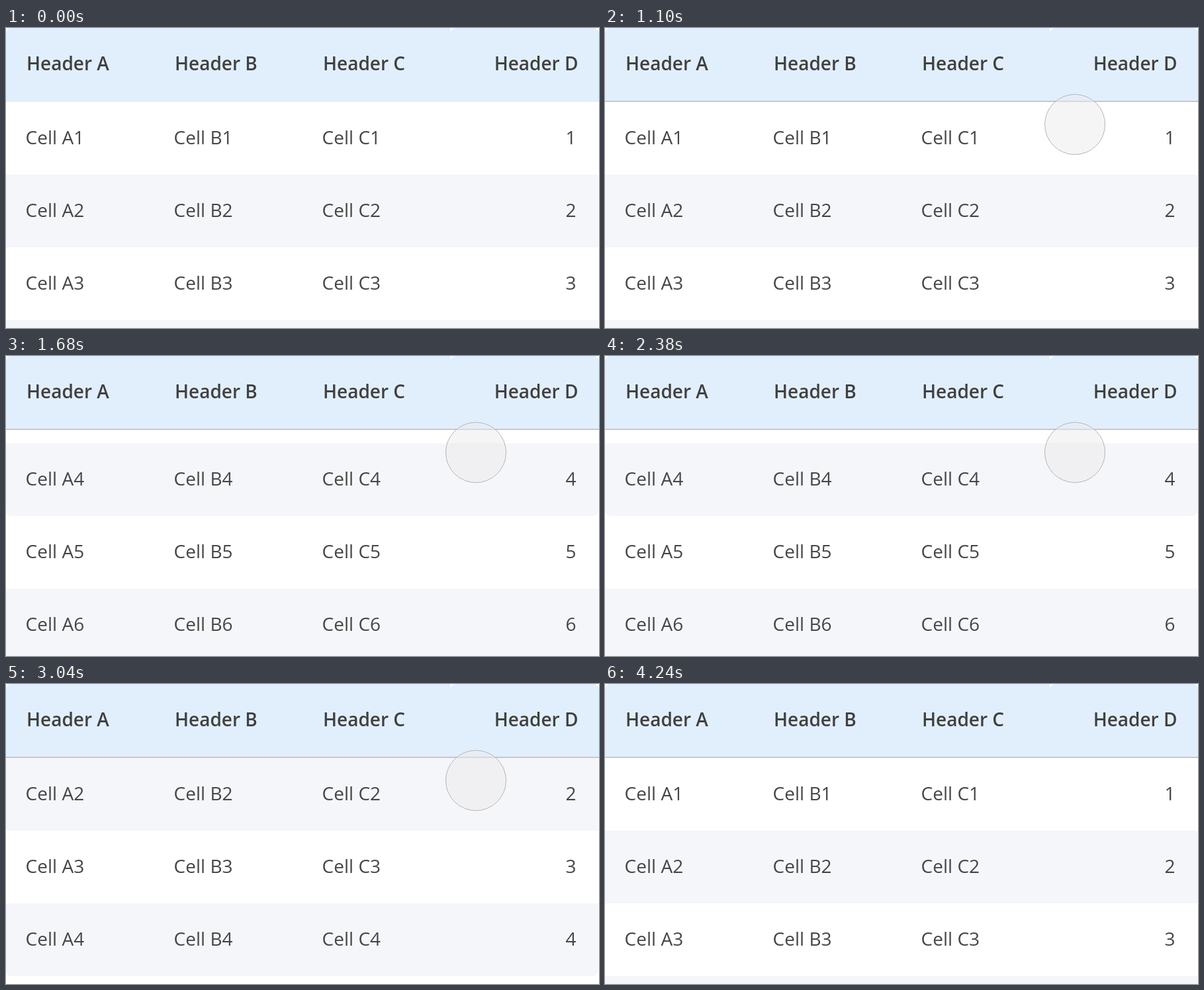
An HTML page with a canvas for the animation above (4720 ms loop, 896 by 454 pixels).

```html
<!DOCTYPE html>
<html lang="en">
<head>
<meta charset="utf-8">
<title>Table with sticky header</title>
<style>
html, body { margin: 0; width: 100%; height: 100%; overflow: hidden; background: #fff; }
canvas { display: block; }
</style>
</head>
<body>
<canvas id="stage" width="896" height="454"></canvas>
<script>
const LOOP = 4720, W = 896, H = 454, HEAD = 112, ROW = 110, COL = 224;
const CELL_FONT = '28px "Open Sans", "Noto Sans", sans-serif';
const HEAD_FONT = '600 28px "Open Sans", "Open Sans SemiBold", "Noto Sans", sans-serif';
const ctx = document.getElementById('stage').getContext('2d');

// [time, value, speed per ms]
const SCROLL = [
  [1150, 0, 0], [1460, 252, .45], [1690, 310, 0],
  [2370, 310, 0], [2760, 184, -.33], [3040, 110, -.3], [3350, 0, 0]
];
// Cursor path, both ways, between the resting place and a point above the stage
const REST = [710, 146], AWAY = [825, -48];

const progress = (t, from, to) => Math.min(1, Math.max(0, (t - from) / (to - from)));

function hermite(keys, t) {
  if (t <= keys[0][0]) return keys[0][1];
  for (let i = 1; i < keys.length; i++) {
    const [t0, a, va] = keys[i - 1], [t1, b, vb] = keys[i];
    if (t > t1) continue;
    const d = t1 - t0, u = (t - t0) / d, s = u * u * (3 - 2 * u);
    return a + (b - a) * s + d * u * (1 - u) * (va * (1 - u) - vb * u);
  }
  return keys[keys.length - 1][1];
}

function box(x, y, w, h, color, radii = 0) {
  ctx.fillStyle = color;
  ctx.beginPath();
  ctx.roundRect(x, y, w, h, radii);
  ctx.fill();
}

function text(str, x, y, align = 'left') {
  ctx.textAlign = align;
  ctx.fillText(str, x, y);
}

function drawRows(scroll) {
  for (let n = 1; n <= 7; n++) {
    const y = HEAD + (n - 1) * ROW - scroll;
    if (n % 2 === 0) box(0, y, 895, ROW, '#f5f6fa', n === 4 ? [0, 0, 8, 8] : 0);
    ctx.font = CELL_FONT;
    ctx.fillStyle = '#464646';
    [...'ABC'].forEach((c, i) => text(`Cell ${c}${n}`, 29.6 + i * COL, y + 64));
    text(n, 861.5, y + 64, 'right');
  }
}

function drawHeader(lineAlpha) {
  box(0, 0, W, HEAD, '#fff');
  box(0, 0, 3 * COL, HEAD, '#e1effd', [8, 0, 0, 0]);
  box(3 * COL, 0, COL, HEAD, '#e1effd', [8, 8, 0, 0]);
  ctx.font = HEAD_FONT;
  ctx.fillStyle = '#404040';
  [...'ABC'].forEach((c, i) => text('Header ' + c, 31 + i * COL, 64));
  text('Header D', 864.5, 64, 'right');
  ctx.globalAlpha = lineAlpha;
  box(0, 110, W, 2, '#c5c8cd');
  ctx.globalAlpha = 1;
}

function drawCursor(t) {
  const enter = 1 - progress(t, 80, 540), leave = progress(t, 3780, 4240);
  const away = enter ** 2 + leave ** 2;
  if (away >= 1) return;
  const settle = 2 * (1 - progress(t, 680, 840));
  const [x, y] = REST.map((v, i) => v + (AWAY[i] - v) * away);
  const disc = r => {
    ctx.beginPath();
    ctx.arc(x + settle, y, r, 0, 7);
  };
  disc(45.5);
  ctx.fillStyle = 'rgba(236,236,236,.5)';
  ctx.fill();
  ctx.lineWidth = 1;
  disc(44.5);
  ctx.strokeStyle = 'rgba(255,255,255,.4)';
  ctx.stroke();
  disc(45.5);
  ctx.strokeStyle = '#b2b2b2';
  ctx.stroke();
}

function draw(t) {
  ctx.clearRect(0, 0, W, H);
  drawRows(Math.round(hermite(SCROLL, t)));
  drawHeader(progress(t, 900, 1060));
  drawCursor(t);
}

const start = performance.now();
function tick() {
  draw((performance.now() - start) % LOOP);
  requestAnimationFrame(tick);
}
tick();
</script>
</body>
</html>
```
